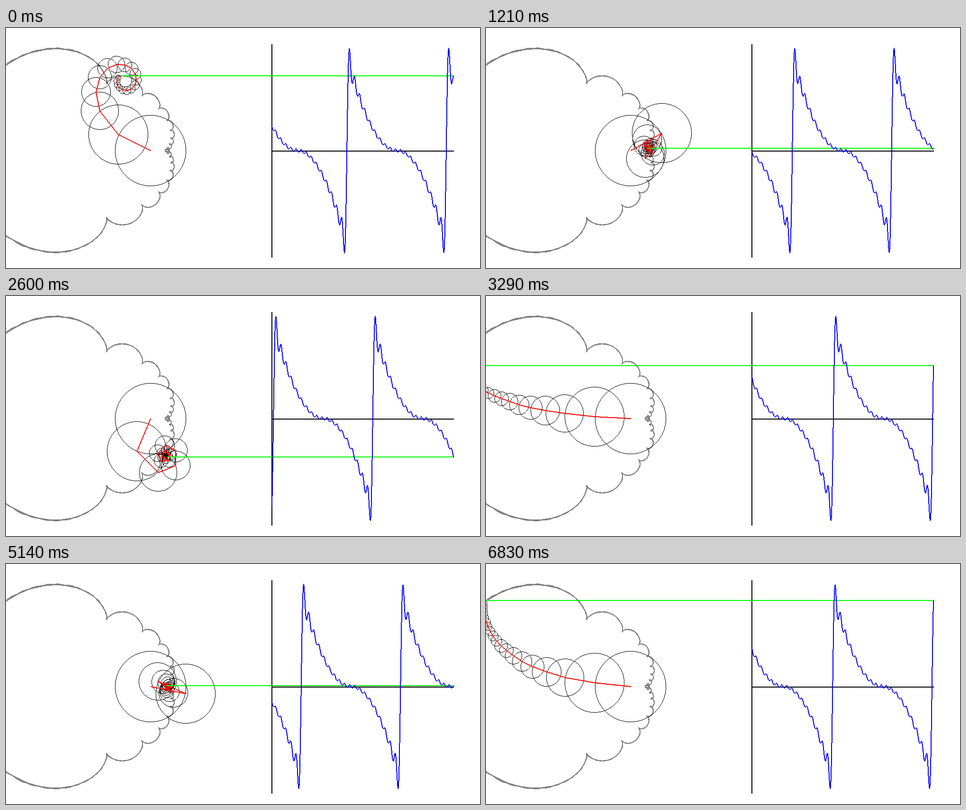
Write a matplotlib script that moves like this. It is 1000 by 507 pixels and loops after 6.9 s.

```python
import math
import numpy as np
import matplotlib.pyplot as plt
from matplotlib.animation import FuncAnimation
from matplotlib.patches import PathPatch
from matplotlib.path import Path

W, H, DPI = 1000, 507, 64
FRAMES, LOOP_MS = 230, 6900
SLOT = LOOP_MS // FRAMES
CX, CY = 305, 259              # pivot of the first arm
LEFT, RIGHT = 561, 944         # extent of the scrolling plot
AXIS_Y = 260
STEP, START = 0.029983, 2.685  # radians per tick, first angle

# Fourier sine series of the odd parabola x|x|, peak height 200
TERMS = 19
n = np.arange(1, TERMS + 1)
amps = 400 / np.pi**3 * ((-1.0)**(n + 1) * np.pi**2 / n
                         + 2 * ((-1.0)**n - 1) / n**3)


def joints(angle):
    """Arm joints in stage coordinates, from the pivot to the tip."""
    path = np.concatenate([[0], np.cumsum(amps * np.exp(1j * n * angle))])
    return CX + path.real, CY - path.imag


def tips(angles):
    z = np.exp(1j * np.outer(angles, n)) @ amps
    return CX + z.real, CY - z.imag


def ring(radius):
    """Pixel offsets of a thin circle, without stair corners."""
    r = radius - 0.5
    half = math.floor(r * math.sqrt(0.5) + 0.5)
    u = np.arange(-half, half) + 0.5
    v = np.sqrt(r * r - u * u)
    return np.floor(np.concatenate([np.c_[u, v], np.c_[u, -v],
                                    np.c_[v, u], np.c_[-v, u]]))


def boxes_path(boxes):
    """Crisp path made of pixel boxes given as x0, y0, x1, y1."""
    corners = boxes[:, [0, 1, 2, 1, 2, 3, 0, 3, 0, 1]].reshape(-1, 2)
    codes = [Path.MOVETO] + [Path.LINETO] * 3 + [Path.CLOSEPOLY]
    return Path(corners, np.tile(codes, len(boxes)))


def line_path(x, y):
    """Polyline two pixels thick across its main direction, not smoothed."""
    x, y = np.floor(x), np.floor(y)
    dx, dy = np.abs(np.diff(x)), np.abs(np.diff(y))
    dist = np.concatenate([[0], np.cumsum(np.maximum(dx, dy))])
    s = np.arange(dist[-1] + 1)
    px = np.floor(np.interp(s, dist, x) + 0.5)
    py = np.floor(np.interp(s, dist, y) + 0.5)
    steep = (dy > dx)[np.maximum(np.searchsorted(dist, s) - 1, 0)]
    boxes = np.c_[px - steep, py - ~steep, px + 1, py + 1]
    return boxes_path(np.unique(boxes, axis=0))


def ticks_at(frame):
    """Ticks run in the last picture that starts within this time slot."""
    centis = (SLOT * (frame + 1) - 10) / 10
    picture = math.ceil((centis + 1.85) / 7.69) - 1
    return max(0, round(4.585 * picture - 0.8))


fig = plt.figure(figsize=(W / DPI, H / DPI), dpi=DPI, facecolor="white")
ax = fig.add_axes([0, 0, 1, 1])
ax.set_xlim(0, W)
ax.set_ylim(H, 0)
ax.axis("off")


def layer(color, z, x=(0, 0), y=(0, 0)):
    return ax.add_patch(PathPatch(line_path(x, y), fc=color, ec="none",
                                  lw=0, snap=False, zorder=z))


layer("#808080", 1, *tips(START + STEP * np.arange(749)))
layer("black", 2, [LEFT, LEFT], [34, 484])
layer("black", 2, [LEFT, RIGHT], [AXIS_Y, AXIS_Y])
circles = layer("black", 3)
arm = layer("red", 4)
pointer = layer("lime", 5)
wave = layer("blue", 6)

rings = [ring(r) for r in np.floor(np.abs(amps))]
age = np.arange(RIGHT - LEFT + 1)


def draw(frame):
    angle = START - STEP * ticks_at(frame)
    x, y = joints(angle)
    cells = np.concatenate([cell + np.floor([px, py])
                            for cell, px, py in zip(rings, x, y)])
    circles.set_path(boxes_path(np.c_[cells, cells + 1]))
    arm.set_path(line_path(x, y))
    pointer.set_path(line_path([x[-1], RIGHT], [y[-1], y[-1]]))
    wave.set_path(line_path(RIGHT - age, tips(angle + STEP * age)[1]))
    return [circles, arm, pointer, wave]


anim = FuncAnimation(fig, draw, frames=FRAMES, interval=SLOT,
                     repeat=True, repeat_delay=0, blit=False)
plt.show()
```
